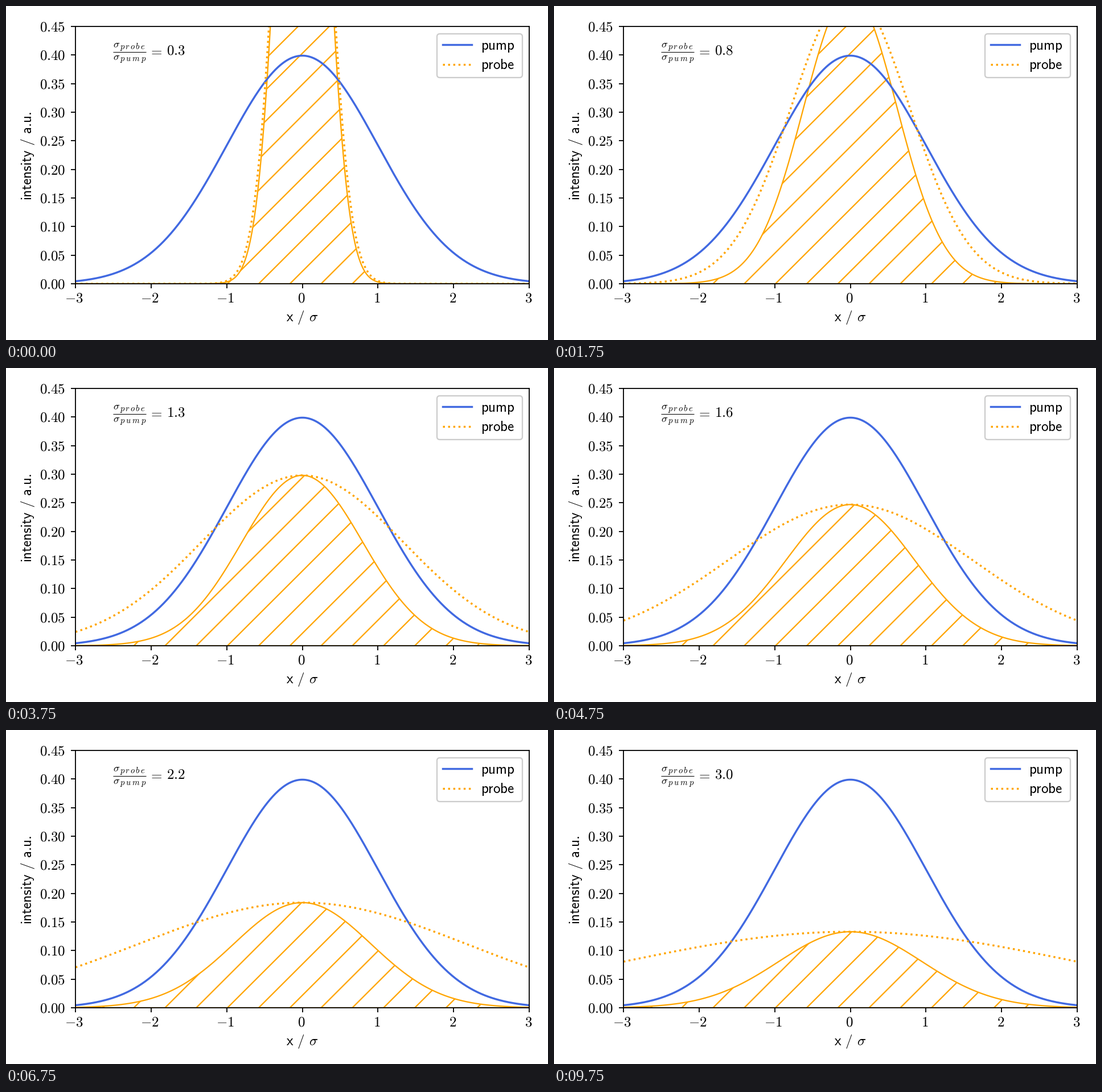
A matplotlib script that plays this animation: 952 by 588 pixels, repeating every 10000 ms.

```python
import numpy as np
import matplotlib.pyplot as plt
from matplotlib.animation import FuncAnimation
from matplotlib.collections import LineCollection
from matplotlib.lines import Line2D
from matplotlib.patches import FancyBboxPatch, Polygon
from matplotlib.transforms import Affine2D

W, H, DPI = 952, 588, 128
PT = 164.5 / DPI  # drawing scale of one typographic point
LEFT, RIGHT, TOP, BOTTOM = 122, 919, 36, 489
X_MAX, Y_MAX = 3, 0.45
FRAMES, INTERVAL = 40, 250
BLUE, ORANGE = "royalblue", "orange"

plt.rcParams["mathtext.fontset"] = "cm"

fig = plt.figure(figsize=(W / DPI, H / DPI), dpi=DPI, facecolor="white")
px = Affine2D().scale(1 / W, -1 / H).translate(0, 1) + fig.transFigure

ax = fig.add_axes([LEFT / W, 1 - BOTTOM / H,
                   (RIGHT - LEFT) / W, (BOTTOM - TOP) / H])
ax.set_xlim(-X_MAX, X_MAX)
ax.set_ylim(0, Y_MAX)
x_ticks = np.arange(-3, 4)
y_ticks = np.arange(10) * 0.05
ax.set_xticks(x_ticks)
ax.set_yticks(y_ticks)
ax.tick_params(length=3.5 * PT, width=0.8 * PT,
               labelbottom=False, labelleft=False)
for spine in ax.spines.values():
    spine.set_linewidth(0.8 * PT)


def put(x, y, tex, size=10.95, **kw):
    """Write math text with its pen origin at pixel (x, y)."""
    return fig.text(x - 1, y, f"${tex}$", fontsize=size * PT, transform=px,
                    ha="left", va="baseline", color="black", **kw)


def sans(text):
    return rf"\mathsf{{{text}}}"


# Tick labels
for v in x_ticks:
    cx = LEFT + (v + X_MAX) / (2 * X_MAX) * (RIGHT - LEFT)
    put(cx - (18 if v < 0 else 7.3), 522, str(v))
for v in y_ticks:
    put(60.4, BOTTOM - v / Y_MAX * (BOTTOM - TOP) + 8.5, f"{v:.2f}")

# Axis labels
gap = r"\hspace{0.38}"
put(492.5, 555, sans("x") + gap + "/" + gap + r"\sigma")
put(46, 342, sans("intensity" + gap + "/" + gap + r"a.\!u."),
    rotation=90, rotation_mode="anchor")

# Ratio of the two widths
put(188.5, 73, r"\sigma", 8)
put(200.5, 76, r"p\,r\,o\,b\,e", 6.4)
put(188.5, 95, r"\sigma", 8)
put(200.5, 97.5, r"p\:u\:m\:p", 6.4)
fig.add_artist(Line2D([188, 246], [80.5, 80.5], lw=0.45 * PT, color="black",
                      transform=px, solid_capstyle="butt"))
put(251, 86, "=")
ratio_text = put(283.3, 86, sans("0.3"))

# Legend
fig.add_artist(FancyBboxPatch((757, 49), 149.5, 77, transform=px,
                              boxstyle="round,pad=0,rounding_size=5",
                              fc="white", ec="0.8", lw=PT, snap=True))
for y, name, color, style in ((67.7, "pump", BLUE, "-"),
                              (102.5, "probe", ORANGE, ":")):
    fig.add_artist(Line2D([767.3, 817.5], [y, y], color=color, ls=style,
                          lw=1.5 * PT, transform=px))
    put(835.5, y + 8.8, sans(name))

# Curves
x = np.linspace(-X_MAX, X_MAX, 500)


def gauss(sigma):
    return np.exp(-x**2 / (2 * sigma**2)) / (sigma * np.sqrt(2 * np.pi))


ax.plot(x, gauss(1), color=BLUE, lw=1.5 * PT)
probe, = ax.plot(x, gauss(1), color=ORANGE, ls=":", lw=1.5 * PT)

area = ax.add_patch(Polygon([(0, 0), (1, 0), (0, 1)], closed=True, fc="none",
                            ec=ORANGE, lw=PT, zorder=1))
sums = 549 + 54.83 * np.arange(-8, 18)  # x + y of each diagonal
hatch = LineCollection([[(s - BOTTOM, BOTTOM), (s - TOP, TOP)] for s in sums],
                       colors=ORANGE, linewidths=PT, transform=px, zorder=1)
ax.add_collection(hatch, autolim=False)


def update(i):
    ratio = 0.3 + 2.7 * i / (FRAMES - 1)
    y = gauss(ratio)
    probe.set_ydata(y)
    overlap = np.column_stack([x, y * np.exp(-x**2 / 2)])
    area.set_xy(np.vstack([[-X_MAX, 0], overlap, [X_MAX, 0]]))
    hatch.set_clip_path(area)
    ratio_text.set_text(f"${sans(f'{ratio:.1f}')}$")
    return probe, area, hatch, ratio_text


anim = FuncAnimation(fig, update, frames=FRAMES, interval=INTERVAL,
                     repeat=True, repeat_delay=0, blit=False)
plt.show()
```
